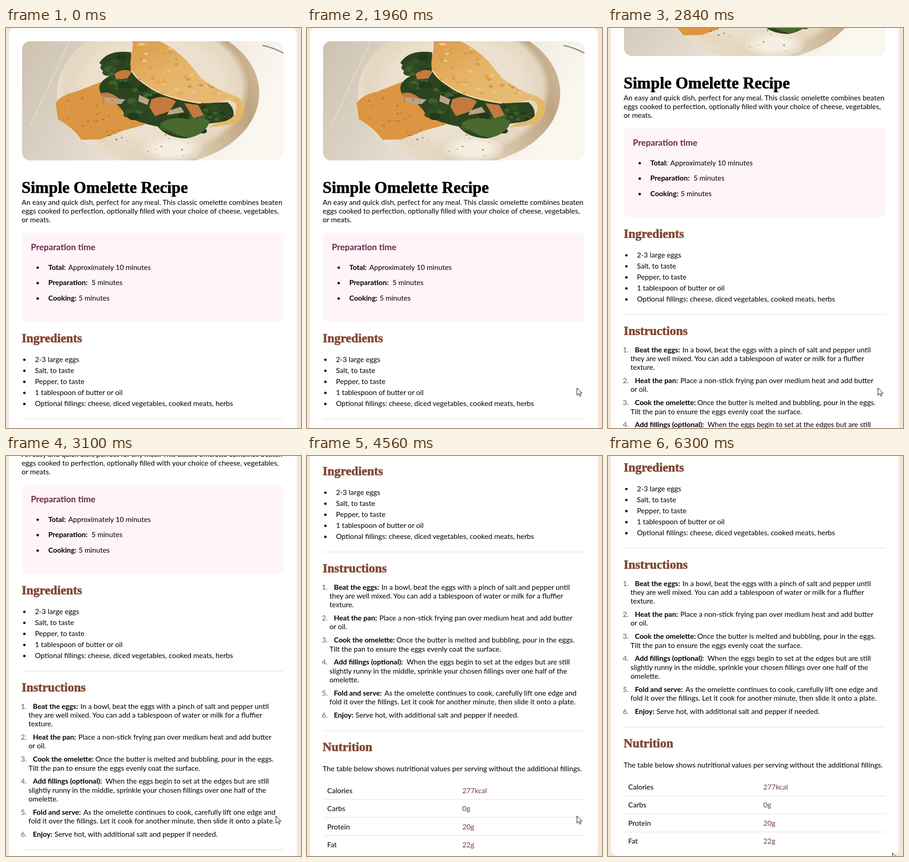
Animation, 642 px wide and 873 px high, one loop 7290 ms. Source, as an HTML page:

```html
<!DOCTYPE html>
<html lang="en">
<head>
<meta charset="utf-8">
<title>Simple Omelette Recipe</title>
<style>
  html, body { margin: 0; width: 100%; height: 100%; overflow: hidden; background: #f3e6d8; }
  svg { display: block; }
  text { font: 15.6px Lato, sans-serif; white-space: pre; }
  .bold { font-weight: 700; }
  .label { font-size: 18.8px; font-weight: 700; fill: #6f2947; }
  .title, .heading { font: 700 35.4px "Liberation Serif", serif; stroke: #000; stroke-width: .7; }
  .heading { font-size: 27px; fill: #804632; stroke: #804632; }
  .number { fill: #804a42; text-anchor: end; }
  .value { fill: #703f47; }
  .rule { stroke: #e2ded9; }
</style>
</head>
<body>
<svg width="642" height="873" viewBox="0 0 642 873">
  <defs>
    <clipPath id="frame"><rect x="35" y="29" width="569" height="260" rx="17"/></clipPath>
    <clipPath id="fold"><path id="foldShape" d="M275 29H334C368 44 396 72 414 96C436 126 470 137 500 149C480 161 452 165 424 164C384 158 348 150 320 134C296 118 280 108 272 90C267 66 279 49 275 29Z"/></clipPath>
    <linearGradient id="table" x2="1" y2=".25">
      <stop offset="0" stop-color="#cdc2b0"/><stop offset=".25" stop-color="#d9cfc0"/>
      <stop offset=".75" stop-color="#f1ebe2"/><stop offset="1" stop-color="#faf6f0"/>
    </linearGradient>
    <linearGradient id="rim" x1="0" x2="1" y1=".8" y2=".5">
      <stop offset="0" stop-color="#eee3d1"/><stop offset=".6" stop-color="#dccbb0"/>
      <stop offset=".92" stop-color="#bda480"/><stop offset="1" stop-color="#c9b291"/>
    </linearGradient>
    <radialGradient id="bowl">
      <stop offset=".7" stop-color="#ebe0cd"/><stop offset=".92" stop-color="#e4d6bf"/>
      <stop offset="1" stop-color="#e4d6bf" stop-opacity="0"/>
    </radialGradient>
    <radialGradient id="shine">
      <stop offset=".5" stop-color="#f5eee2"/><stop offset="1" stop-color="#f0e6d6" stop-opacity=".3"/>
    </radialGradient>
    <linearGradient id="egg" x1="0" x2="1" y1="0" y2="1">
      <stop offset="0" stop-color="#d99a48"/><stop offset=".45" stop-color="#e6b468"/><stop offset="1" stop-color="#e6bd78"/>
    </linearGradient>
  </defs>
  <g id="page">
    <rect x="6.500" y="-4" width="626.500" height="1531" rx="20" fill="#fff"/>
    <g clip-path="url(#frame)">
      <path d="M35 29H604V289H35Z" fill="url(#table)"/>
      <path d="M138 29L52 215" stroke="#e6dccb" stroke-width="2"/>
      <path d="M558 38Q580 42 604 55" fill="none" stroke="#8f867b" stroke-width="2.500"/>
      <ellipse cx="331" cy="142" rx="220" ry="158" fill="url(#rim)"/>
      <ellipse cx="322" cy="132" rx="208" ry="152" fill="url(#bowl)"/>
      <ellipse cx="362" cy="264" rx="66" ry="28" fill="url(#shine)"/>
      <path d="M108 164Q120 146 152 139L206 118L250 160L302 211L255 224L205 243L164 244Q146 218 113 199Z" fill="#db9543"/>
      <path d="M203 76Q222 46 272 53L276 96Q300 125 340 142Q400 167 482 162Q502 178 492 202L440 209Q432 234 392 241Q350 240 330 215Q284 207 258 188Q246 164 206 142Q194 120 230 102Z" fill="#2c4320"/>
      <g id="greens"></g>
      <path d="M336 208Q362 190 398 200Q430 192 443 204Q437 230 398 239Q364 236 336 208Z" fill="#49692f"/>
      <path d="M204 144Q226 134 250 158L222 164ZM236 100Q256 86 274 95L264 110L240 112ZM316 156Q342 144 370 160L356 182L324 192L312 172ZM388 164L418 168L430 190L408 197Z" fill="#c47a3e"/>
      <path d="M210 150L260 156L250 166L222 166ZM290 146L312 156L308 168L288 160ZM356 180L380 172L388 184L350 190Z" fill="#bda386"/>
      <path d="M500 149Q523 160 517 184Q512 210 474 213L440 217Q456 206 474 204Q502 196 502 172Q500 158 484 158Z" fill="#e2b968"/>
      <use href="#foldShape" fill="url(#egg)"/>
      <path d="M272 90C280 108 296 118 320 134C348 150 384 158 424 164" fill="none" stroke="#f2d7a2" stroke-width="3"/>
      <g id="eggSpots" clip-path="url(#fold)"></g>
      <g id="crumbs"></g>
    </g>
    <rect x="35" y="447" width="568.500" height="194" rx="9" fill="#fff4fa"/>
    <g id="content"></g>
  </g>
  <path id="cursor" d="M.5 .5V16.500L4.300 13L6.800 18.600L9.200 17.500L6.700 12H11.800Z" fill="#fff" stroke="#000"/>
</svg>
<script>
const $ = id => document.getElementById(id);

function add(parent, tag, attributes, content = '') {
  const node = document.createElementNS('http://www.w3.org/2000/svg', tag);
  for (const name in attributes) node.setAttribute(name, attributes[name]);
  node.textContent = content;
  $(parent).append(node);
}

// y is the middle of a line of body text.
const text = (x, y, content, style = '') =>
  add('content', 'text', { x, y: y + 5.5, class: style }, content);
const bullet = (x, y) => add('content', 'circle', { cx: x, cy: y + 1, r: 2.6 });
const rule = y => add('content', 'line', { class: 'rule', x1: 35, x2: 603.5, y1: y, y2: y });

let seed = 7;
const random = () => (seed = seed * 16807 % 2147483647) / 2147483647;
const between = (low, high) => low + (high - low) * random();

function scatter(parent, count, [x1, y1, x2, y2], size, colors) {
  for (let i = 0; i < count; i++) {
    const r = between(size / 2, size);
    add(parent, 'ellipse', {
      cx: between(x1, x2), cy: between(y1, y2), rx: r, ry: r * .65,
      fill: colors[i % colors.length]
    });
  }
}

const leaves = ['#2d4b20', '#22391a', '#3e6029', '#314f25'];
scatter('greens', 24, [215, 60, 268, 132], 13, leaves);
scatter('greens', 26, [265, 130, 330, 195], 13, leaves);
scatter('greens', 24, [345, 185, 430, 225], 13, leaves);
scatter('greens', 24, [430, 172, 490, 200], 8, leaves);
scatter('eggSpots', 80, [270, 29, 490, 160], 6, ['#d7984a', '#ecc483', '#dfa858']);
scatter('crumbs', 30, [130, 150, 250, 235], 2, ['#a66428']);
scatter('crumbs', 14, [210, 225, 400, 278], 2, ['#66583b']);

text(34, 354.5, 'Simple Omelette Recipe', 'title');
['An easy and quick dish, perfect for any meal. This classic omelette combines beaten',
 'eggs cooked to perfection, optionally filled with your choice of cheese, vegetables,',
 'or meats.'].forEach((line, i) => text(34, 380 + i * 19.3, line));

text(54, 479.5, 'Preparation time', 'label');
[['Total:', 135.5, 'Approximately 10 minutes'],
 ['Preparation:', 186, '5 minutes'],
 ['Cooking:', 158, '5 minutes']].forEach(([name, x, time], i) => {
  const y = 522 + i * 33.7;
  bullet(69, y);
  text(92, y, name, 'bold');
  text(x, y, time);
});

text(34, 680.5, 'Ingredients', 'heading');
['2-3 large eggs', 'Salt, to taste', 'Pepper, to taste', '1 tablespoon of butter or oil',
 'Optional fillings: cheese, diced vegetables, cooked meats, herbs'].forEach((item, i) => {
  bullet(40, 723 + i * 24.1);
  text(63, 723 + i * 24.1, item);
});
rule(853.5);

text(34, 892.5, 'Instructions', 'heading');
let y = 930;
[['Beat the eggs:', 162, 'In a bowl, beat the eggs with a pinch of salt and pepper until',
  'they are well mixed. You can add a tablespoon of water or milk for a fluffier', 'texture.'],
 ['Heat the pan:', 157.5, 'Place a non-stick frying pan over medium heat and add butter', 'or oil.'],
 ['Cook the omelette:', 194.5, 'Once the butter is melted and bubbling, pour in the eggs.',
  'Tilt the pan to ensure the eggs evenly coat the surface.'],
 ['Add fillings (optional):', 216.5, 'When the eggs begin to set at the edges but are still',
  'slightly runny in the middle, sprinkle your chosen fillings over one half of the', 'omelette.'],
 ['Fold and serve:', 168.5, 'As the omelette continues to cook, carefully lift one edge and',
  'fold it over the fillings. Let it cook for another minute, then slide it onto a plate.'],
 ['Enjoy:', 105.5, 'Serve hot, with additional salt and pepper if needed.']
].forEach(([name, x, first, ...rest], i) => {
  text(45, y, `${i + 1}.`, 'number');
  text(58.5, y, name, 'bold');
  text(x, y, first);
  rest.forEach(line => text(49, y += 19.3, line));
  y += 28.9;
});
rule(1243.5);

text(34, 1282.5, 'Nutrition', 'heading');
text(34, 1326, 'The table below shows nutritional values per serving without the additional fillings.');
[['Calories', '277kcal'], ['Carbs', '0g'], ['Protein', '20g'], ['Fat', '22g']].forEach(([name, value], i) => {
  const rowY = 1374 + i * 39.5;
  text(44, rowY, name);
  text(338, rowY, value, 'value');
  if (i < 3) rule(Math.round(rowY + 18.5) + .5);
});

// Progress of a move drawn in evenly timed steps, the last one landing at end.
function stepped(time, start, end, steps) {
  if (time < start) return 0;
  const step = Math.floor((time - start) / (end - start) * (steps - 1) + .01);
  const u = Math.min(1, (step + 1) / steps);
  return u * u * (3 - 2 * u);
}

const scrolls = [
  [2030, 2290, 5, 174], [2750, 3100, 6, 210], [3570, 3900, 6, 171],
  [4360, 4560, 4, 89], [5810, 6300, 8, 8]
];

function draw(now) {
  const time = now % 7290;
  const scroll = scrolls.reduce((sum, [start, end, steps, distance]) =>
    sum + distance * stepped(time, start, end, steps), 0);
  $('page').setAttribute('transform', `translate(0 ${-Math.round(scroll)})`);

  const enter = 1 - stepped(time, 1100, 1690, 10);
  const leave = stepped(time, 5810, 6300, 8);
  const cursorX = Math.round(587 + 40 * enter + 32 * leave);
  const cursorY = Math.round(785 + 90 * enter + 81 * leave);
  $('cursor').setAttribute('transform', `translate(${cursorX} ${cursorY})`);
}

const begin = performance.now();
function tick() {
  draw(performance.now() - begin);
  requestAnimationFrame(tick);
}
tick();
</script>
</body>
</html>
```
